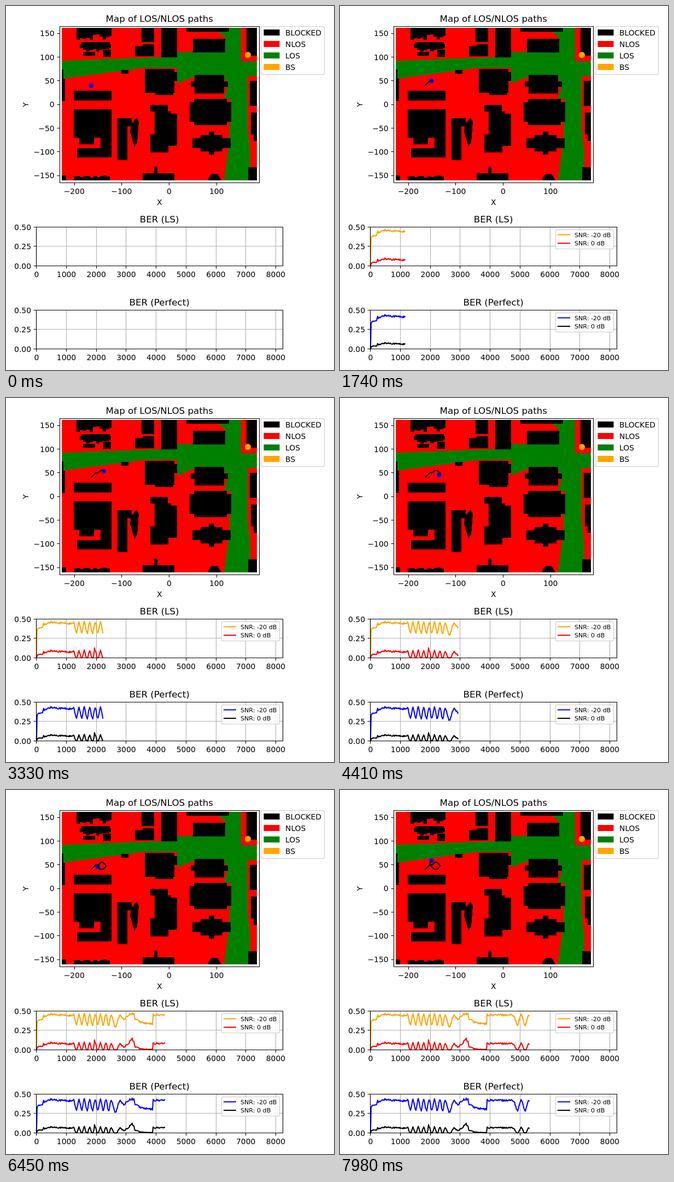
An HTML page for the animation above (8 s loop, 600 by 666 pixels).

```html
<!DOCTYPE html>
<html lang="en">
<head>
<meta charset="utf-8">
<title>Link quality along a path</title>
<style>
html, body { margin: 0; width: 100%; height: 100%; overflow: hidden; background: #fff; }
svg { display: block; width: 600px; height: 666px; font: 13.89px "DejaVu Sans", sans-serif; }
.title { font-size: 16.67px; }
.small { font-size: 11.11px; }
.map { shape-rendering: crispEdges; }
.axis { fill: none; stroke: #000; stroke-width: 1.11; }
.grid { fill: none; stroke: #b0b0b0; stroke-width: 1.11; }
.box { fill: #fff; fill-opacity: .8; stroke: #ccc; stroke-width: 1.1; }
.curve { fill: none; stroke-width: 2.08; stroke-linejoin: round; }
</style>
</head>
<body>
<svg id="stage" viewBox="0 0 600 666"></svg>
<script>
const STEP = 30, LOOP = 8000, LAST = 266;
const LEFT = 55.5, RIGHT = 506.5, ORIGIN = 55.8, STEP_X = 1.094, UNIT = 142;

const random = n => { const v = Math.sin(n * 127.1) * 43758.5453; return v - Math.floor(v); };
const bump = (k, at, width) => Math.exp(-(((k - at) / width) ** 2));
const wave = (k, peak, period) => .5 + .5 * Math.cos(2 * Math.PI * (k - peak) / period);

// Error rate at low signal: each phase holds until its end step
const phases = [
  [62, k => Math.min(.36 + .0045 * k, .475 - .0006 * k) + .04 * bump(k, 12, .7)],
  [125, k => .32 + .14 * wave(k, 71, 9)],
  [156, k => .45 - .15 * (156 - k) / 23 * (1 - wave(k, 125, 15))],
  [164, () => .465],
  [195, k => .33 + .08 * Math.exp((164 - k) / 10)],
  [239, () => .45],
  [Infinity, k => .32 + .13 * wave(k, 239, 13)]
];
const weak = k => phases.find(([end]) => k < end)[1](k) + .026 * (random(k) - .5);
const strong = k => .1 * (Math.max(0, weak(k) - .32) / .15) ** 1.4 +
  .06 * bump(k, 97, .7) + .05 * bump(k, 159, 3) + .015 * bump(k, 5, 6);

const series = [
  { bottom: 475.5, color: 'orange', rate: weak },
  { bottom: 475.5, color: 'red', rate: strong },
  { bottom: 627.5, color: 'blue', rate: k => weak(k) - .029 },
  { bottom: 627.5, color: 'black', rate: k => strong(k) * .83 }
];
for (const s of series) {
  s.points = Array.from({ length: LAST + 1 }, (_, k) =>
    (ORIGIN + k * STEP_X).toFixed(2) + ',' + (s.bottom - (k ? s.rate(k) : 0) * UNIT).toFixed(2));
}

const text = (x, y, str, anchor = 'middle', cls = '') =>
  `<text x="${x}" y="${y}" text-anchor="${anchor}" class="${cls}">${str}</text>`;
const path = (d, attrs) => `<path d="${d}" ${attrs}/>`;
const box = (x, y, w, h) => `<rect class="box" x="${x}" y="${y}" width="${w}" height="${h}" rx="2.8"/>`;
const minus = v => String(v).replace('-', '\u2212');

const block = (x0, y0, x1, y1) => `M${x0} ${y0}H${x1}V${y1}H${x0}Z`;

// Stacked centred blocks, each narrower and taller than the one before
function stepped(cx, cy, halfW, halfH, dx, dy, tiers) {
  let d = '';
  for (let i = 0; i < tiers; i++) {
    const w = halfW - i * dx, h = halfH + i * dy;
    d += block(cx - w, cy - h, cx + w, cy + h);
  }
  return d;
}

// Thin columns from a straight top down to an uneven edge, or up when depth is negative
function ragged(x0, x1, y, depth) {
  let d = '';
  for (let x = x0; x < x1; x += 6) d += block(x, y, Math.min(x + 6, x1), y + depth * (.5 + .5 * random(x + y)));
  return d;
}

const northWest = ragged(129, 193, 40, 23) + block(138, 66, 190, 71) + ragged(135, 192, 70, 14) +
  block(141, 84, 163, 91) + block(178, 80, 192, 93) +
  block(248, 40, 271, 66) + block(250, 70, 271, 74) + block(236, 73, 271, 92) + block(284, 40, 313, 94);
const northEast = block(330, 40, 408, 47) + block(342, 60, 401, 85) + block(440, 40, 459, 91) +
  stepped(372, 142.5, 34, 5, 7, 12, 2);
const middle = block(102, 116, 105, 134) + block(102, 133, 108, 174) + block(211, 117, 224, 124) +
  block(254, 115, 308, 159) + block(273, 121, 313, 137) + block(273, 137, 306, 163) + block(124, 155, 193, 173);
const southWest = block(124, 189, 193, 241) + block(134, 241, 161, 253) + block(173, 241, 193, 277) +
  block(130, 260, 193, 277) + block(204, 205, 222, 282) + block(222, 205, 230, 220) +
  'M229 216L239 204L243 212L240 250L235 258L227 230Z';
const southEast = block(264, 181, 296, 193) + block(272, 193, 302, 240) + block(290, 197, 313, 256) +
  block(264, 235, 297, 268) + stepped(374, 193.8, 38, 18, 8, 6, 2) + stepped(375.5, 250.5, 35, 9, 15, 6, 3);
const edges = block(102, 310, 110, 319) + ragged(124, 190, 319, -10) + block(271, 294, 277, 306) +
  block(250, 306, 308, 319) + 'M370 319V316L376 307H387L394 319Z' + block(443, 295, 459, 319) +
  block(446, 137, 459, 183) + block(448, 195, 459, 235) + block(453, 235, 459, 247);

const sightLines = 'M102 100L240 95L313 93V84H401V57L388 47V40H430V101H459V128H442V225L447 265V295H443V319H399' +
  'L408 250L411 170H399L406 144L395 126H352L313 142V113H254L187 122L102 133Z';
const route = 'M155.7 145.4L164.3 136.7H168.8L173.2 132.4H177.5L181.8 136.2L183 138.5L181.6 141.2' +
  'L177.5 145.2H172.5L164.3 136.7V133L167.4 129.5';

function mapPanel() {
  let out = '<g class="map">' + path(block(102, 40, 459, 319), 'fill="red"') +
    path(sightLines, 'fill="green"') +
    path(northWest + northEast + middle + southWest + southEast + edges, 'fill="black"') + '</g>';
  let ticks = block(98.5, 37.5, 463.5, 323.5);
  for (let v = -200; v <= 100; v += 100) {
    const x = 298.5 + v * .8665;
    ticks += `M${Math.floor(x) + .5} 323.5v5`;
    out += text(v < 0 ? x - .5 : x, 344, minus(v));
  }
  for (let v = -150; v <= 150; v += 50) {
    const y = 180.2 - v * .8665;
    ticks += `M98.5 ${Math.floor(y) + .5}h-5`;
    out += text(88.6, y + 5.2, minus(v), 'end');
  }
  out += text(280.8, 29, 'Map of LOS/NLOS paths', 'middle', 'title') + text(280.8, 364, 'X') +
    '<text transform="translate(41 180.5) rotate(-90)" text-anchor="middle">Y</text>' +
    '<circle cx="442.5" cy="89.5" r="5.5" fill="orange"/>' +
    '<circle id="dot" r="4.2" fill="blue"/>' +
    path(route, 'id="trail" class="curve" stroke="black"') +
    path(ticks, 'class="axis"') + box(466.5, 37.5, 116, 88);
  [['BLOCKED', 'black'], ['NLOS', 'red'], ['LOS', 'green'], ['BS', 'orange']].forEach(([name, color], i) => {
    const y = 43 + i * 21;
    out += path(block(471.5, y, 500.5, y + 11), `fill="${color}"`) + text(511, y + 10.8, name, 'start');
  });
  return out;
}

function chart(top, title, first) {
  const bottom = top + 71, mid = top + 35;
  let grid = `M${LEFT} ${mid}H${RIGHT}`, ticks = '', out = '';
  for (let v = 0; v <= 8000; v += 1000) {
    const x = ORIGIN + v / 20 * STEP_X, px = Math.floor(x + .05) + .5;
    grid += `M${px} ${top}V${bottom}`;
    ticks += `M${px} ${bottom}v5`;
    out += text(x, bottom + 20.5, v);
  }
  [['0.50', top], ['0.25', mid], ['0.00', bottom]].forEach(([label, y]) => {
    ticks += `M${LEFT} ${y}h-5`;
    out += text(46, y + 5.3, label, 'end');
  });
  out += text(280.6, top - 8.3, title, 'middle', 'title') + path(grid, 'class="grid"');
  const pair = [first, first + 1];
  for (const i of pair) out += `<polyline id="curve${i}" class="curve" stroke="${series[i].color}"/>`;
  out += path(block(LEFT, top, RIGHT, bottom) + ticks, 'class="axis"');
  out += '<g class="legend">' + box(394.5, top + 5, 106, 35);
  pair.forEach((n, i) => {
    const y = top + 14 + i * 15.6;
    out += path(`M398 ${y}H421`, `class="curve" stroke="${series[n].color}"`) +
      text(429, y + 4, i ? 'SNR: 0 dB' : 'SNR: -20 dB', 'start', 'small');
  });
  return out + '</g>';
}

const stage = document.getElementById('stage');
stage.innerHTML = mapPanel() + chart(404.5, 'BER (LS)', 0) + chart(556.5, 'BER (Perfect)', 2);
const dot = document.getElementById('dot'), trail = document.getElementById('trail');
const routeLength = trail.getTotalLength();
const curves = series.map((_, i) => document.getElementById('curve' + i));
const legends = [...document.querySelectorAll('.legend')];

function render(time) {
  const k = Math.min(LAST, Math.floor(time % LOOP / STEP));
  const walked = routeLength * k / LAST, at = trail.getPointAtLength(walked);
  dot.setAttribute('cx', at.x);
  dot.setAttribute('cy', at.y);
  trail.setAttribute('stroke-dasharray', walked + ' ' + 2 * routeLength);
  curves.forEach((c, i) => c.setAttribute('points', series[i].points.slice(0, k + 1).join(' ')));
  for (const el of [trail, ...curves, ...legends]) el.style.display = k ? '' : 'none';
}

const start = performance.now();
function tick(now) {
  render(Math.max(0, now - start));
  requestAnimationFrame(tick);
}
render(0);
requestAnimationFrame(tick);
</script>
</body>
</html>
```
